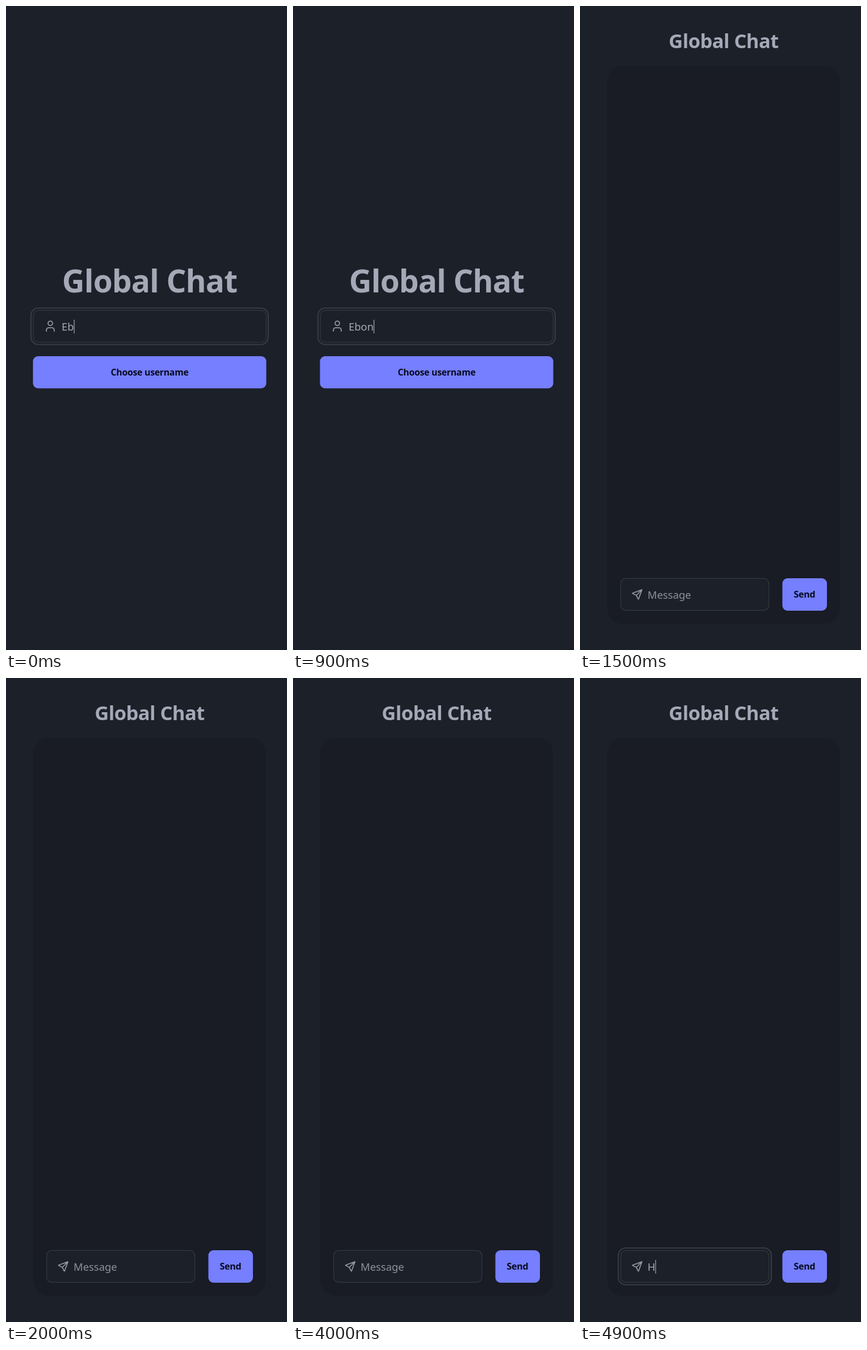
An HTML page that plays this animation: 495 by 1131 pixels, repeating every 5000 ms.

```html
<!DOCTYPE html>
<html lang="en">
<head>
<meta charset="utf-8">
<title>Global Chat</title>
<style>
  html, body { margin: 0; height: 100%; overflow: hidden; background: #1c2029; }
  svg { display: block; width: 100%; height: 100%; }
  text { font: 18.4px "Noto Sans", "Open Sans", sans-serif; fill: #a3a9b6; }
  .bold { font-weight: 700; letter-spacing: -.016em; text-anchor: middle; }
  .label { fill: #080a20; }
  .button { fill: #757fff; }
  .hint { fill: #8b919c; }
  .box { fill: #1c2029; stroke: #343941; stroke-width: 1.2; }
  .ring { fill: none; stroke: #363b44; stroke-width: 2.2; }
  .icon { fill: none; stroke: #9097a3; stroke-width: 1.9; stroke-linecap: round; stroke-linejoin: round; }
  .caret { fill: #a3a9b6; }
</style>
</head>
<body>
<svg viewBox="0 0 495 1131">
  <g id="login">
    <text class="bold" x="253" y="503" style="font-size:55px">Global Chat</text>
    <rect class="ring" x="44" y="530.5" width="418" height="64" rx="13"/>
    <rect class="box" x="48.2" y="534.7" width="410" height="55.8" rx="9"/>
    <g class="icon" transform="translate(66.3 550.4) scale(.98)">
      <circle cx="12" cy="7" r="4"/>
      <path d="M19 21v-2a4 4 0 0 0-4-4H9a4 4 0 0 0-4 4v2"/>
    </g>
    <text id="name" x="98" y="569.5"></text>
    <rect id="nameCaret" class="caret" y="551" width="1.2" height="24"/>
    <rect class="button" x="47.5" y="615" width="411" height="56.5" rx="9"/>
    <text class="bold label" x="253" y="649" style="font-size:15.8px">Choose username</text>
  </g>
  <g id="chat">
    <text class="bold" x="253" y="74" style="font-size:34.5px">Global Chat</text>
    <rect x="48" y="104.5" width="410" height="980.5" rx="27" fill="#191c24"/>
    <rect id="ring" class="ring" x="67.5" y="1001" width="269.5" height="64.5" rx="13"/>
    <rect class="box" x="71.7" y="1005.4" width="261" height="56" rx="9"/>
    <path class="icon" transform="translate(90.2 1022.4) scale(.9)"
      d="M10 14L21 3l-6.5 18a.55.55 0 0 1-1 0L10 14l-7-3.5a.55.55 0 0 1 0-1L21 3"/>
    <text id="hint" class="hint" x="119" y="1040.5">Message</text>
    <text id="message" x="119" y="1040.5"></text>
    <rect id="messageCaret" class="caret" y="1022" width="1.2" height="24"/>
    <rect class="button" x="356.5" y="1005" width="78.5" height="57" rx="9"/>
    <text class="bold label" x="395.5" y="1039.3" style="font-size:16px">Send</text>
  </g>
</svg>
<script>
  const LOOP = 5000, SWITCH = 1000, FOCUS = 4100, TYPE = 4800;
  const $ = id => document.getElementById(id);
  const show = (id, on) => $(id).style.display = on ? "" : "none";

  function type(id, text) {
    const field = $(id);
    field.textContent = text;
    const width = text ? field.getComputedTextLength() : 0;
    $(id + "Caret").setAttribute("x", +field.getAttribute("x") + width);
  }

  function draw(now) {
    const t = now % LOOP;
    const inChat = t >= SWITCH, focused = t >= FOCUS, typed = t >= TYPE;
    show("login", !inChat);
    show("chat", inChat);
    if (inChat) {
      show("ring", focused);
      show("messageCaret", focused);
      show("hint", !typed);
      type("message", typed ? "H" : "");
    } else {
      type("name", "Ebon".slice(0, 2 + (t >= 200) + (t >= 400)));
    }
    requestAnimationFrame(draw);
  }

  const start = performance.now();
  const tick = () => draw(Math.max(0, performance.now() - start));
  const frame = requestAnimationFrame;
  window.requestAnimationFrame = () => frame(tick);
  tick();
</script>
</body>
</html>
```
